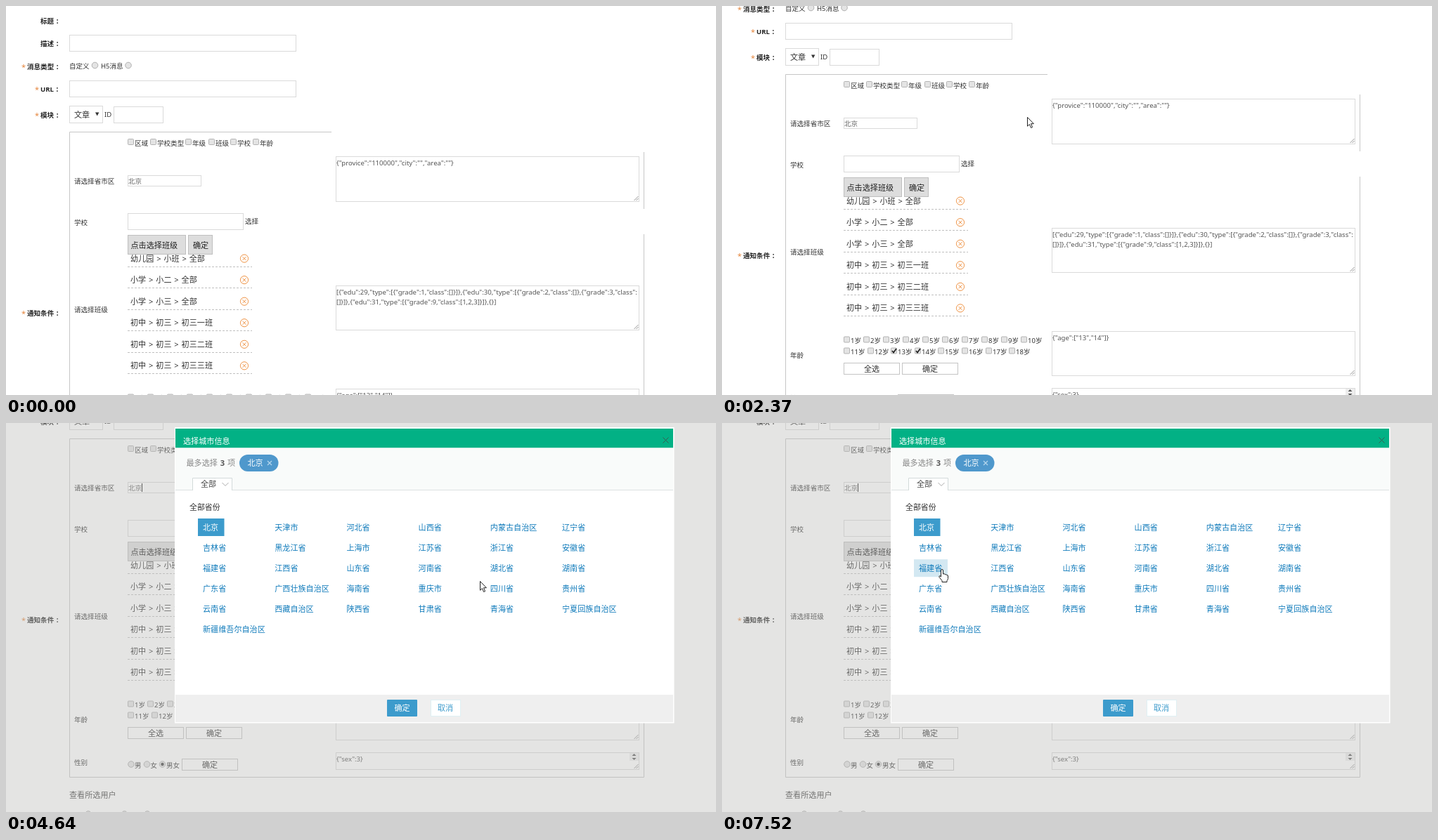
An HTML page that plays this animation: 1010 by 554 pixels, repeating every 8 s.

```html
<!DOCTYPE html>
<html lang="zh-CN">
<head>
<meta charset="utf-8">
<title>通知条件</title>
<style>
html, body { margin: 0; width: 100%; height: 100%; overflow: hidden; background: #fff; }
svg { display: block; width: 1010px; height: 554px; }
text { font-family: 'Noto Sans', 'Noto Sans CJK SC', 'Noto Sans CJK', sans-serif; white-space: pre; }
</style>
</head>
<body>
<svg id="stage" viewBox="0 0 1010 554" xmlns="http://www.w3.org/2000/svg"></svg>
<script>
const SMALL = 9.55, BIG = 11.1, LOOP = 8000;

// Drawing helpers; text is placed by its left edge and vertical centre.
const text = (x, cy, s, size = SMALL, fill = '#333', extra = '') =>
  `<text x="${x}" y="${cy + size * .37}" font-size="${size}" fill="${fill}" ${extra}>${s}</text>`;
const rect = (x, y, w, h, fill, extra = '') =>
  `<rect x="${x}" y="${y}" width="${w}" height="${h}" fill="${fill}" ${extra}/>`;
const path = (d, stroke, extra = '') => `<path d="${d}" fill="none" stroke="${stroke}" ${extra}/>`;
const box = (x, y, x2, y2, fill = '#fff', stroke = '#dadada') =>
  rect(x + .5, y + .5, x2 - x - 1, y2 - y - 1, fill, `stroke="${stroke}"`);
const label = (x, y, s, star) =>
  text(x, y, s + '<tspan dx="2.6">：</tspan>', SMALL, '#222', 'font-weight="700"') +
  (star ? text(x - 8, y + 1, '*', 11, '#e5853c') : '');
const radio = (x, y, on) =>
  `<circle cx="${x}" cy="${y}" r="4.3" fill="#e4e4e4" stroke="#a8a8a8" stroke-width=".9"/>` +
  (on ? `<circle cx="${x}" cy="${y}" r="2.2" fill="#444"/>` : '');
const check = (x, y, s, on) =>
  rect(x + .5, y - 4.5, 8, 8, '#e4e4e4', 'rx="1" stroke="#adadad" stroke-width=".9"') +
  (on ? path(`M${x + 2},${y - .5}l2,2.5l4,-5.5`, '#222', 'stroke-width="1.7"') : '') +
  text(x + 10, y + 1, s);
const area = (y, y2, ...lines) =>
  box(469, y, 901, y2) +
  path(`M893.5,${y2 - 2}l6,-6M896.5,${y2 - 2}l3,-3`, '#888', 'stroke-width=".9"') +
  lines.map((s, i) => text(470, y + 9 + i * 14.4, s, 9.58, '#555')).join('');
const button = (x, y, s) =>
  box(x, y, x + 80, y + 17, '#fff', '#c4c4c4') + text(x + 40, y + 8.8, s, BIG, '#333', 'text-anchor="middle"');

function listRow(s, i) {
  const y = 359.6 + i * 30.55;
  return text(177, y, s.replace(/>/g, '&gt;'), BIG, '#333', 'word-spacing="1"') +
    `<circle cx="339" cy="${y}" r="5.6" fill="none" stroke="#ef9446"/>` +
    path(`M336.5,${y - 2.5}l5,5m0,-5l-5,5`, '#ef9446') +
    path(`M173,${Math.round(y + 11) + .5}H350`, '#c0c0c0', 'stroke-dasharray="3 2"');
}

function form() {
  const filters = [[173, '区域'], [205, '学校类型'], [255, '年级'], [288, '班级'], [319, '学校'], [351, '年龄']];
  const classes = ['幼儿园 > 小班 > 全部', '小学 > 小二 > 全部', '小学 > 小三 > 全部',
    '初中 > 初三 > 初三一班', '初中 > 初三 > 初三二班', '初中 > 初三 > 初三三班'];
  let out = label(49, 21, '标题') + label(49, 53, '描述') + label(30, 86, '消息类型', 1) +
    label(49, 118, 'URL', 1) + label(49, 155, '模块', 1) + label(30, 437, '通知条件', 1);
  out += box(90, 41, 413, 65) + box(90, 106, 413, 130);
  out += text(90, 85.5, '自定义') + radio(126.5, 84.5) + text(135, 85.5, 'H5消息') + radio(174, 84.5);
  out += box(90, 142, 138, 167) + text(97, 155, '文章', BIG) + '<path d="M127,151.5h5.4l-2.7,5z" fill="#333"/>' +
    text(140, 154, 'ID') + box(153, 143, 224, 167);
  out += path('M463,179.5H90.5V661.5H907.5V325M907.5,208V289', '#c6c6c6');

  out += filters.map(([x, s]) => check(x, 194, s)).join('');
  out += text(97, 249, '请选择省市区') + box(173, 241, 278, 257) + text(174, 249, '北京', SMALL, '#666');
  out += area(214, 279, '{"provice":"110000","city":"","area":""}');
  out += text(97, 308, '学校') + box(173, 295, 338, 319) + text(340, 306.5, '选择');
  out += classes.map(listRow).join('');
  out += box(173, 326, 256, 354, '#ddd', '#bfbfbf') + text(177.5, 340.5, '点击选择班级', BIG, '#222') +
    box(259, 326, 294, 354, '#ddd', '#bfbfbf') + text(266, 340.5, '确定', BIG, '#222');
  out += text(97, 432, '请选择班级') + area(398, 462,
    '[{"edu":29,"type":[{"grade":1,"class":[]}]},{"edu":30,"type":[{"grade":2,"class":[]},{"grade":3,"class":',
    '[]}]},{"edu":31,"type":[{"grade":9,"class":[1,2,3]}]},{}]');

  for (let age = 1; age <= 18; age++) {
    const x = age <= 10 ? 173 + 28 * (age - 1) : 173 + 33.6 * (age - 11);
    out += check(Math.round(x), age <= 10 ? 557.5 : 573.5, age + '岁', age === 13 || age === 14);
  }
  out += text(97, 579, '年龄') + area(545, 609, '{"age":["13","14"]}') +
    button(173, 590, '全选') + button(256, 590, '确定');
  out += text(97, 640, '性别') + radio(178, 643) + text(183, 644, '男') + radio(200.5, 643) + text(205.5, 644, '女') +
    radio(222.5, 643, 1) + text(228, 644, '男女') + button(250, 635, '确定') + area(626, 651, '{"sex":3}') +
    rect(887, 627, 13, 11, '#eee') + '<path d="M890.5,631h6l-3,-3zM890.5,634h6l-3,3z" fill="#555"/>';
  out += text(90, 687, '查看所选用户', BIG, '#444') + [117, 168.5, 201].map(x => radio(x, 714)).join('');
  return out + '<path id="caret" d="M193.5,243V255" stroke="#222" fill="none"/>';
}

const provinces = ('北京 天津市 河北省 山西省 内蒙古自治区 辽宁省 吉林省 黑龙江省 上海市 江苏省 浙江省 安徽省 ' +
  '福建省 江西省 山东省 河南省 湖北省 湖南省 广东省 广西壮族自治区 海南省 重庆市 四川省 贵州省 ' +
  '云南省 西藏自治区 陕西省 甘肃省 青海省 宁夏回族自治区 新疆维吾尔自治区').split(' ');
const links = provinces.map((s, i) => ({
  s, x: 280 + 102.2 * (i % 6), y: 136 + 29.1 * Math.floor(i / 6), w: s.length * 11 + 15
}));

function dialog() {
  let out = rect(240, 6, 710.5, 421.5, '#fff') + rect(241, 8, 708, 27.5, '#02b185') +
    text(252, 25.5, '选择城市信息', BIG, '#fff') +
    path('M934.5,20.5l8,8m0,-8l-8,8', '#3a5a50');
  out += rect(241, 35.5, 708, 60, '#f9fbfa') + path('M241,95.5H949', '#dce2e2') +
    text(256.5, 57, '最多选择 <tspan font-weight="600" fill="#555">3</tspan> 项', BIG, '#888', 'word-spacing="1"');
  out += rect(332, 45, 55.5, 24, '#4f98cc', 'rx="12"') + text(343.5, 57, '北京', BIG, '#fff') +
    path('M372,54l6,6m0,-6l-6,6', '#b5d6ec', 'stroke-width="1.2"');
  out += rect(265, 78, 56, 18, '#fff') + path('M265.5,96V78.5H321.5V96', '#d3dada') +
    text(277, 87, '全部', BIG, '#444') + path('M307.5,85l4.5,4.5l4.5,-4.5', '#aaa');
  out += text(261, 120, '全部省份', 10.9) + rect(273, 136, 37.5, 25, '#3c9bcc') +
    '<rect id="hover" height="25" fill="#d3e8f2"/>';
  out += links.map((l, i) => text(l.x, l.y + 12.7, l.s, BIG, i ? '#107bbb' : '#fff')).join('');
  out += rect(241, 387, 708, 39, '#efefef') + rect(542, 394, 43, 24, '#3c9bcc', 'rx="1"') +
    text(552.5, 406, '确定', BIG, '#fff') + box(604, 394, 647, 418, '#fff', '#dff0f4') +
    text(614, 406, '取消', BIG, '#3c9bcc');
  return out;
}

const pointers = {
  arrow: '<path d="M.5,.5V13.2L3.4,10.5L5.6,15.5L7.6,14.6L5.5,9.7H9.4Z" fill="#fff" stroke="#222"/>',
  hand: '<path d="M-1.5,10V1Q-1.5,-.5 0,-.5T1.5,1V6Q4,5 4.5,7Q6.5,6 6.8,7.7Q8.5,7 8.5,9V12.5Q8.5,14 7,15.5V17.5H0V15.5L-4,10.5Q-4.5,8.5 -3,8.7Z" fill="#fff" stroke="#222"/>',
  beam: '<path d="M-3,-7.5h2.5l.5,.5l.5,-.5h2.5M0,-7V7M-3,7.5h2.5l.5,-.5l.5,.5h2.5" fill="none" stroke="#222"/>'
};

const stage = document.getElementById('stage');
stage.innerHTML = rect(0, 0, 1010, 554, '#fff') + `<g id="page">${form()}</g>` +
  `<g id="modal">${rect(0, 0, 1010, 554, '#bbbbb8', 'opacity=".4"')}${dialog()}</g>` +
  '<g id="cursor">' + Object.entries(pointers).map(([k, v]) => `<g id="${k}">${v}</g>`).join('') + '</g>';
const $ = id => document.getElementById(id);
const show = (id, on) => $(id).setAttribute('visibility', on ? 'visible' : 'hidden');
const move = (id, x, y) => $(id).setAttribute('transform', `translate(${x},${y})`);

// Mouse strokes: start, end, number of steps, way points.
const strokes = [
  [70, 290, 4, [863, 496], [135, -4]],
  [1450, 1680, 4, [177, 38], [434, 158]],
  [2850, 3070, 4, [400, 146], [252, 94]],
  [3620, 4400, 11, [268, 100], [420, 160], [600, 215], [674, 243]],
  [4470, 4790, 5, [674, 246], [674, 236], [674, 225], [684, 232], [694, 242]],
  [5010, 5810, 11, [700, 246], [712, 250], [760, 210], [800, 172]],
  [5880, 5950, 2, [798, 160], [796, 155]],
  [6130, 6900, 11, [767, 166], [650, 185], [520, 206], [408, 207]],
  [7050, 7520, 7, [395, 205], [330, 208], [316, 209], [313, 209]]
];
const scrolls = [[0, 0], [1900, 29], [2000, 45], [2070, 52], [2370, 82], [2460, 98], [2540, 105],
  [2620, 134], [2700, 150], [2770, 157]];
const OPEN = 3230, FOCUS = 3100, BLINK = 530, HOVER_LAG = 75;

function mouse(t) {
  const [t0, t1, n, ...pts] = strokes.filter(s => t >= s[0]).pop() || strokes[0];
  const step = Math.max(0, Math.min(n - 1, Math.floor((t - t0) / (t1 - t0) * (n - 1) + 1e-6)));
  const p = step / (n - 1) * (pts.length - 1);
  const i = Math.min(pts.length - 2, Math.floor(p));
  return [0, 1].map(k => pts[i][k] + (pts[i + 1][k] - pts[i][k]) * (p - i));
}

const linkAt = ([x, y]) => links.findIndex(l => x >= l.x - 7 && x <= l.x - 7 + l.w && y >= l.y && y <= l.y + 25);

function draw(t) {
  const open = t >= OPEN;
  const [x, y] = mouse(t);
  move('page', 0, -scrolls.filter(s => t >= s[0]).pop()[1]);
  show('modal', open);
  show('caret', t >= FOCUS && (t >= 7520 || Math.floor((t - FOCUS) / BLINK) % 2 === 0));

  const hovered = open ? linkAt(mouse(t - HOVER_LAG)) : -1;
  show('hover', hovered > 0);
  if (hovered > 0) {
    const l = links[hovered];
    $('hover').setAttribute('x', l.x - 7);
    $('hover').setAttribute('y', l.y);
    $('hover').setAttribute('width', l.w);
  }

  const visible = t >= 70 && !(t >= 360 && t < 1450);
  const kind = open ? (linkAt([x, y]) >= 0 ? 'hand' : 'arrow') : (t >= 3070 ? 'beam' : 'arrow');
  for (const k in pointers) show(k, visible && k === kind);
  move('cursor', x, y);
}

const start = performance.now();
function tick() {
  draw((performance.now() - start) % LOOP);
  requestAnimationFrame(tick);
}
draw(0);
requestAnimationFrame(tick);
</script>
</body>
</html>
```
